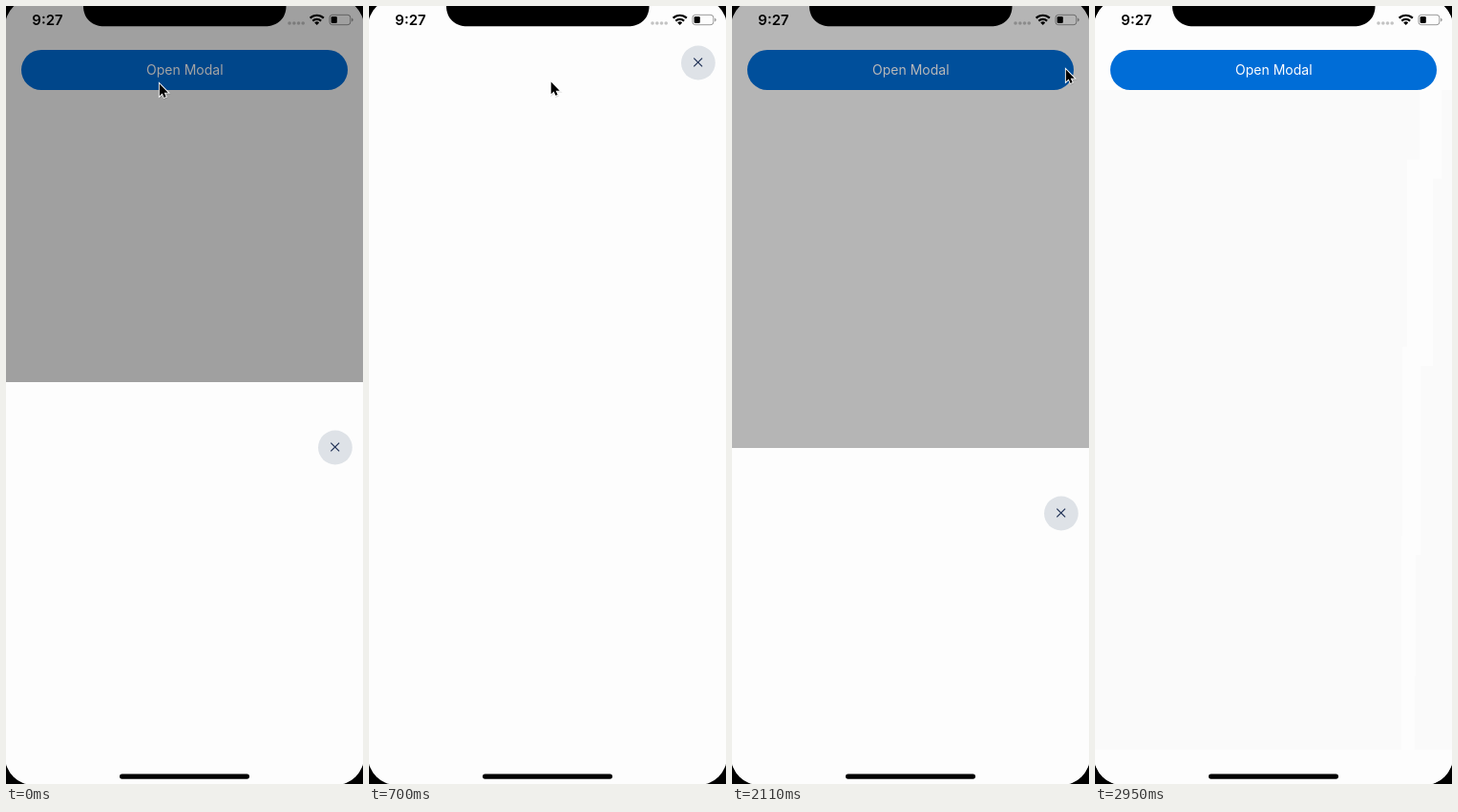
These frames come from a looping animation (374x815 px, 3.31 s). An HTML page:

```html
<!DOCTYPE html>
<html lang="en">
<meta charset="utf-8">
<title>Modal</title>
<style>
  html, body { margin: 0; width: 100%; height: 100%; overflow: hidden; background: #000; }
  svg { display: block; width: 374px; height: 815px; }
  text { font-family: Inter, Roboto, sans-serif; text-anchor: middle; }
</style>
<svg viewBox="0 0 374 815">
  <defs>
    <clipPath id="screen"><rect x="-1" y="-8" width="376" height="824" rx="30"/></clipPath>
    <path id="arrow" d="M0 0V12.8L2.9 10 4.8 14.4 6.9 13.5 5 9.2H9Z"/>
  </defs>
  <g clip-path="url(#screen)">
    <rect width="374" height="815" fill="#fafafa"/>
    <path id="trail" fill="#fdfdfd"/>
    <rect x="16" y="46" width="342" height="42" rx="21" fill="#006dd7"/>
    <text x="187.3" y="72" font-size="14" fill="#fff">Open Modal</text>
    <rect id="dim" width="374" height="815"/>
    <g id="sheet">
      <rect width="374" height="830" fill="#fdfdfd"/>
      <circle cx="344.9" cy="68.5" r="17.9" fill="#dee2e7"/>
      <path d="M340.3 63.6l8.8 8.8m0-8.8l-8.8 8.8" stroke="#1f3055" stroke-width="1.2"/>
    </g>
    <text x="43.5" y="20" font-size="15" font-weight="600">9:27</text>
    <g fill="#000" fill-opacity=".23">
      <circle cx="297" cy="18" r="1.8"/><circle cx="301.8" cy="18" r="1.8"/>
      <circle cx="306.5" cy="18" r="1.8"/><circle cx="311.2" cy="18" r="1.8"/>
    </g>
    <g fill="none" stroke="#000" stroke-width="2.2">
      <path d="M318.6 12.6a10.3 10.3 0 0 1 14.2 0M321.3 15.6a6.5 6.5 0 0 1 8.8 0"/>
      <path d="M323.2 17.4a3.7 3.7 0 0 1 5 0L325.7 20z" fill="#000" stroke="none"/>
    </g>
    <rect x="339" y="9.3" width="21.8" height="10.4" rx="2.8" fill="none" stroke="#000" stroke-opacity=".4"/>
    <rect x="340.6" y="10.9" width="6.2" height="7.2" rx="1.3"/>
    <path d="M362.2 12.6q1.4.4 1.4 1.9t-1.4 1.9z" fill-opacity=".45"/>
    <path d="M81 0C81 13 90 21.3 103 21.3H271C284.5 21.3 293.5 13 293.5 0Z"/>
    <rect x="119" y="804.5" width="136" height="5.2" rx="2.6"/>
    <g id="cursor">
      <use href="#arrow" x=".5" y="1" fill-opacity=".15" stroke="#000" stroke-opacity=".1" stroke-width="2"/>
      <use href="#arrow" stroke="#fff" stroke-width="1.8" paint-order="stroke"/>
    </g>
  </g>
</svg>
<script>
  const LOOP = 3310, REST = 779, EXIT = 2310, STEP = 60;
  const [trail, dim, sheet, cursor] = ['trail', 'dim', 'sheet', 'cursor'].map(id => document.getElementById(id));

  // Progress 0..1 that advances once per step
  const progress = (t, start, end, step = STEP) =>
    t >= end ? 1 : Math.max(0, Math.floor((t - start) / step) * step / (end - start));

  const easeOut = (p, power) => 1 - (1 - p) ** power;
  const easeInOut = (p, power) => p < 0.5 ? (2 * p) ** power / 2 : 1 - (2 - 2 * p) ** power / 2;
  const flick = p => 1 / (1 + (0.325 / p) ** 3.6);

  function sheetTop(t) {
    const open = easeOut(progress(t, 0, 230, 57.5), 3);
    const close = easeInOut(progress(t, 1930, 2260), 2.3);
    return Math.round(394 - 403 * open + (REST + 9) * close);
  }

  function cursorAt(t) {
    const across = progress(t, 472, 1050, 57) ** 1.6;
    const reach = easeOut(progress(t, 1050, 1400, 50), 2);
    const leave = flick(progress(t, EXIT, 2950));
    return [
      160.8 + 132.5 * across + 56.5 * reach - 28.5 * easeOut(leave, 3.3),
      81.5 - 9 * across - 6 * reach + 780 * leave
    ];
  }

  // Area repainted behind the departing cursor
  function trailPath(t) {
    const first = EXIT + STEP;
    let path = t < first ? '' : 'M0 0H374V88H0Z';
    for (let time = first + STEP; time <= t; time += STEP) {
      const [left, bottom] = cursorAt(time).map(Math.round);
      const [right, top] = cursorAt(time - STEP).map(Math.round);
      path += `M${left} ${top}H${right + 14}V${bottom + 20}H${left}Z`;
    }
    return path;
  }

  function draw(now) {
    const t = now % LOOP;
    const top = sheetTop(t);
    sheet.setAttribute('transform', `translate(0 ${top})`);
    dim.setAttribute('opacity', 0.894 * ((REST - top) / REST) ** 1.29);
    cursor.setAttribute('transform', `translate(${cursorAt(t)})`);
    trail.setAttribute('d', trailPath(t));
    requestAnimationFrame(draw);
  }
  draw(performance.now());
</script>
</html>
```
